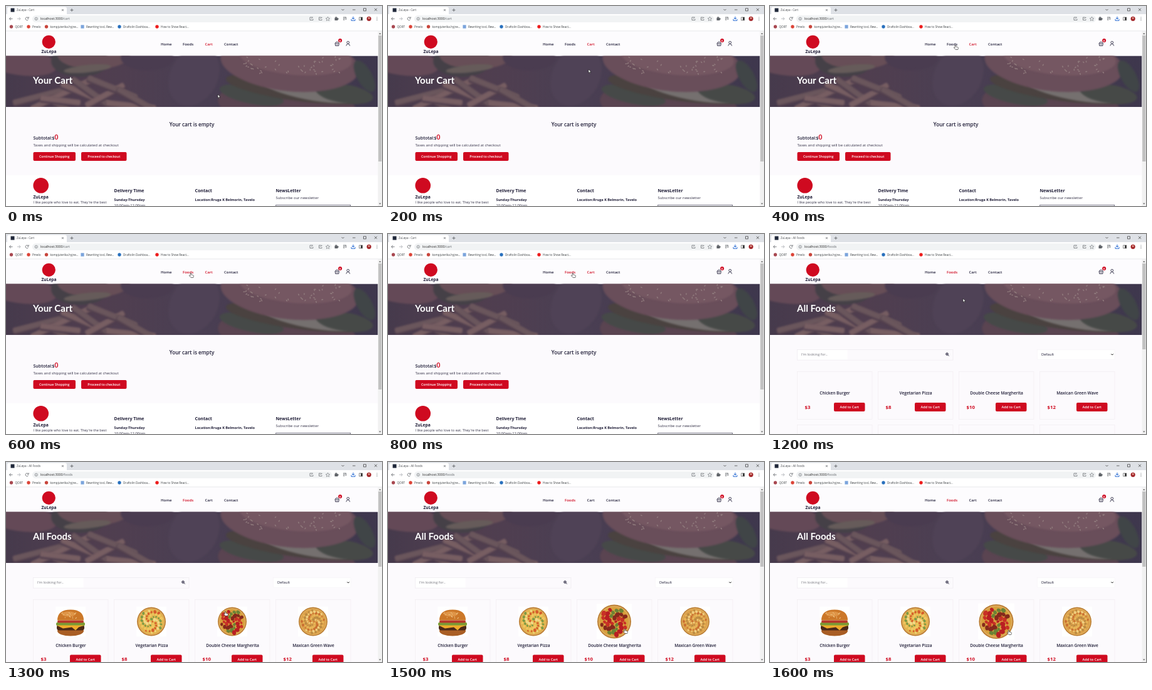
Animation, 600 px wide and 319 px high, one loop 1700 ms. Source, as an HTML page with a canvas:

```html
<!DOCTYPE html>
<html lang="en">
<head>
<meta charset="utf-8">
<title>Food shop</title>
<style>
html, body { margin: 0; width: 100%; height: 100%; overflow: hidden; background: #fff; }
canvas { display: block; width: 600px; height: 319px; }
</style>
</head>
<body>
<canvas id="stage"></canvas>
<script>
const W = 600, H = 319, LOOP = 1700, STEP = 100;
const RED = '#cf0a20', INK = '#1d1b35', GREY = '#5f6368';
const SANS = '"Open Sans", "Noto Sans", sans-serif';
const BRAND = 'ZuLepa';
const canvas = document.getElementById('stage');
const ctx = canvas.getContext('2d');
const ratio = window.devicePixelRatio || 1;
canvas.width = W * ratio;
canvas.height = H * ratio;

// Pointer position at each step of the loop.
const POINTER = [
  [338, 141], [335, 133], [320, 101], [303, 73], [296, 62], [296, 62], [295, 62], [295, 62], [295, 62],
  [295, 62], [295, 63], [299, 76], [308, 103], [350, 238], [366, 256], [378, 266], [381, 268]
];

function rect(x, y, w, h, color) {
  ctx.fillStyle = color;
  ctx.fillRect(x, y, w, h);
}
function round(x, y, w, h, r, color) {
  ctx.fillStyle = color;
  ctx.beginPath();
  ctx.roundRect(x, y, w, h, r);
  ctx.fill();
}
function frame(x, y, w, h, color, width = .6) {
  ctx.strokeStyle = color;
  ctx.lineWidth = width;
  ctx.strokeRect(x, y, w, h);
}
function oval(x, y, rx, ry, color, turn = 0) {
  ctx.fillStyle = color;
  ctx.beginPath();
  ctx.ellipse(x, y, rx, ry, turn, 0, 7);
  ctx.fill();
}
function disc(x, y, r, color) { oval(x, y, r, r, color); }
function ring(x, y, r, color, width = .8, from = 0, to = 7) {
  ctx.strokeStyle = color;
  ctx.lineWidth = width;
  ctx.beginPath();
  ctx.arc(x, y, r, from, to);
  ctx.stroke();
}
function line(path, color, width = .8) {
  ctx.strokeStyle = color;
  ctx.lineWidth = width;
  ctx.stroke(new Path2D(path));
}
function text(str, x, y, size, color = INK, weight = 400, align = 'left', family = SANS) {
  ctx.font = `${weight} ${size}px ${family}`;
  ctx.fillStyle = color;
  ctx.textAlign = align;
  ctx.fillText(str, x, y);
}
function button(label, x, y, w, size) {
  round(x, y, w, 14, 2, RED);
  text(label, x + w / 2, y + 9, size, '#fff', 600, 'center');
}
function random(seed) {
  return () => (seed = (seed * 16807) % 2147483647) / 2147483647;
}

function drawBrowser(title, path) {
  rect(0, 0, W, 13, '#dee1e6');
  round(2, 1.5, 95, 14, [3, 3, 0, 0], '#fff');
  rect(0, 13, W, 27, '#fff');
  rect(0, 39.6, W, .6, '#d8dade');
  rect(7.5, 3.5, 6, 6, '#20283a');
  text(`${BRAND} - ${title}`, 17, 8.4, 4.5, '#45484d');
  line('M89 5l3 3m0-3l-3 3 M102.5 6.5h5m-2.5-2.5v5', '#45484d', .7);
  line('M535.5 5l2 2 2-2 M553 6h4.5 M570.5 3.8h4v4h-4z M588 3.8l4 4m0-4l-4 4', '#333', .7);

  line('M10.5 20.3h-5m2.3-2.4l-2.4 2.4 2.4 2.4', GREY);
  line('M18 20.3h5m-2.3-2.4l2.4 2.4-2.4 2.4', '#a9adb2');
  ring(33.5, 20.3, 2.4, GREY, .8, .4, 5.6);
  line('M36.2 17.2v2.3h-2.3', GREY);
  round(42, 15, 478, 11, 5.5, '#f1f3f4');
  ring(48.2, 20.4, 2.2, GREY, .6);
  line('M48.2 20v1.6m0-2.7v.5', GREY, .6);
  const host = 'localhost:3000';
  text(host, 55, 22.2, 5.25, '#222');
  text(path, 55 + ctx.measureText(host).width, 22.2, 5.25, GREY);

  line('M489 18h-4v4.5h5v-2 M487 20.5l3-2.8 M502 18h-2.5v4.5h4.5v-1.5 M501 20.5q1-2 3-2m-1-1l1 1-1 1', GREY, .7);
  line('M513.5 17.3l1 2 2.2.3-1.6 1.5.4 2.2-2-1-2 1 .4-2.2-1.6-1.5 2.2-.3z', GREY, .6);
  round(524.5, 18.5, 5, 4.6, .6, GREY);
  disc(526.7, 18, 1.1, GREY);
  disc(529.8, 20.6, 1.1, GREY);
  line('M538 18h5m-5 2h3m-3 2h2.5 M542.5 18v4', GREY, .9);
  line('M554 16.8v4m-2-1.8l2 2 2-2 M551 21v2.2h6V21', '#2367d1', 1);
  frame(563.8, 18, 5, 4.8, '#333');
  rect(566.2, 18, 2.6, 4.8, '#333');
  disc(579.2, 20.3, 3.6, '#a52a2e');
  disc(579.2, 19.2, 1.2, '#efc2ae');
  [18, 20.3, 22.6].forEach(y => disc(592, y, .6, GREY));

  const marks = [
    [8.5, '#a84850', 'QORT'], [36, '#dc4437', 'Pmelo'], [64.5, '#c8453b', 'kompjuterika.hyjne...'],
    [122, '#7ba4dc', 'Rewriting tool, Rew...'], [181, '#2870bd', 'Draftolin Dashboa...'],
    [241, '#ee1c1c', 'How to Show React...']
  ];
  marks.forEach(([x, color, label], i) => {
    if (i === 3) rect(x - 2.6, 30.3, 5.2, 5.4, color);
    else disc(x, 33, 2.7, color);
    text(label, x + 6, 34.8, 4.6, '#3c4043');
  });
}

function drawScrollbar(bottom) {
  rect(593.5, 40, 6.5, 279, '#f1f1f1');
  rect(594.2, 47, 5.2, bottom - 47, '#c1c1c1');
  ctx.fillStyle = '#666';
  ctx.fill(new Path2D('M595 45l1.8-2 1.8 2z M595 314.5l1.8 2 1.8-2z'));
}

function drawHeader(foodsColor, cartColor) {
  rect(0, 40, 593.5, 39.5, '#fdfcfe');
  disc(68.3, 57.3, 10.6, RED);
  text(BRAND, 68.5, 75.2, 6.6, INK, 700, 'center');
  [['Home', 247, INK], ['Foods', 282, foodsColor], ['Cart', 317.5, cartColor], ['Contact', 348, INK]]
    .forEach(([label, x, color]) => text(label, x, 63, 6, color, 600));
  line('M525 59.2h6.6l-.7 4.2h-5.2z M526.2 59l1.4-2.6m2.8 2.6l-1.4-2.6 M527.2 60.5v1.8m2.2-1.8v1.8', INK, .8);
  disc(533.2, 55, 3, RED);
  text('0', 533.2, 56.5, 4, '#fff', 700, 'center');
  ring(545.8, 58.2, 1.9, INK, .8);
  line('M542.9 63.6q0-3 2.9-3t2.9 3', INK, .8);
}

function drawHero(title) {
  const top = 79.5, bottom = 161;
  ctx.save();
  ctx.beginPath();
  ctx.rect(0, top, 593.5, bottom - top);
  ctx.clip();
  const base = ctx.createLinearGradient(0, 0, 594, 0);
  base.addColorStop(0, '#4c3e4e');
  base.addColorStop(.25, '#584352');
  base.addColorStop(.5, '#514456');
  base.addColorStop(1, '#423b4f');
  rect(0, top, 594, 82, base);
  ctx.filter = 'blur(1.5px)';

  oval(20, 88, 62, 22, '#70515b', .15);
  oval(118, 88, 46, 25, '#4a4648');
  oval(140, 78, 58, 23, '#74575b');
  oval(130, 100, 38, 6, '#72675f', -.1);
  oval(225, 82, 42, 20, '#504053');
  oval(300, 112, 38, 50, '#56485a', .5);

  // Fries fan out over the board: x, y, length, angle.
  [[10, 150, 92, -.25], [38, 160, 110, -.45], [78, 148, 90, .5], [90, 120, 100, .4], [108, 112, 96, .62],
   [125, 155, 70, -.5], [132, 110, 85, .38], [160, 150, 80, .1], [180, 128, 65, .52], [55, 142, 65, .12]]
    .forEach(([x, y, len, angle], i) => {
      ctx.save();
      ctx.translate(x, y);
      ctx.rotate(angle);
      round(0, 2, len, 10, 3, '#594450');
      round(0, 0, len, 9, 3, i % 2 ? '#876a69' : '#776061');
      ctx.restore();
    });

  oval(448, 158, 110, 38, '#644a54', .08);
  oval(392, 142, 52, 14, '#4b5149', .2);
  oval(462, 132, 112, 19, '#50483f', .14);
  oval(480, 136, 70, 13, '#858079', .2);
  oval(540, 140, 46, 15, '#4c5148', .15);
  oval(453, 92, 111, 44, '#76565f', .1);
  oval(462, 82, 90, 28, '#856269', .08);
  oval(572, 112, 12, 28, '#444b48', -.5);
  ctx.filter = 'none';

  const rnd = random(41);
  for (let i = 0; i < 48; i++) {
    oval(380 + rnd() * 155, 81 + rnd() * 28, 1.6, .8, '#a58c89', rnd() * 3);
  }
  rect(0, top, 594, 82, 'rgba(48,42,68,.18)');
  ctx.restore();
  text(title, 43, 124, 15, '#fff', 700, 'left', 'Lato, sans-serif');
}

function drawCart() {
  text('Your cart is empty', 296.5, 192, 8.2, INK, 600, 'center');
  text('Subtotal:', 43.5, 212.5, 7, INK, 600);
  text('$', 73.5, 212.5, 7, INK, 600);
  text('0', 77.3, 213, 11, RED, 600);
  text('Taxes and shipping will be calculated at checkout', 43.5, 223.5, 6, '#343247');
  button('Continue Shopping', 43.5, 233, 67.5, 5.3);
  button('Proceed to checkout', 120, 233, 72.5, 5.3);

  rect(0, 270, 593.5, 49, '#fff');
  disc(55.7, 286.3, 12.3, RED);
  text(BRAND, 43.5, 306.5, 6.7, INK, 700);
  text("I like people who love to eat. They're the best", 43.5, 315.2, 5.6, '#343247');
  text('Delivery Time', 172.5, 297.2, 7, INK, 700);
  text('Sunday-Thursday', 172.5, 311, 5.7, INK, 700);
  text('10:00am-11:00pm', 172.5, 320.2, 5.9, '#343247');
  text('Contact', 301.5, 297.2, 7, INK, 700);
  text('Location:Rruga K Belmorin, Tavelo', 301.5, 311, 5.6, INK, 700);
  text('NewsLetter', 430.5, 297.2, 6.9, INK, 700);
  text('Subscribe our newsletter', 430.5, 308, 5.9, '#343247');
  frame(430.7, 317.5, 119, 15, '#44425a', .7);
}

function drawBurger() {
  oval(0, 15, 21, 8, '#a95e25');
  round(-22, 5, 44, 9, 4, '#4b2918');
  round(-23, 1, 46, 6, 3, '#7b9b35');
  round(-21, -2, 42, 4, 2, '#b8372b');
  ctx.fillStyle = '#efab2a';
  ctx.fill(new Path2D('M-22 6h44l-9 3-5 5-6-5-14 2z'));
  ctx.fillStyle = '#cc7829';
  ctx.fill(new Path2D('M-21-2q0-17 21-17t21 17z'));
  oval(-3, -12, 11, 4, '#df9547');
  const rnd = random(9);
  for (let i = 0; i < 18; i++) oval(-14 + rnd() * 28, -15 + rnd() * 10, .8, .5, '#f4d59a');
}

function drawPizza(seed, cheese, toppings, count, size) {
  disc(0, 0, 23, '#b87931');
  disc(0, 0, 21.6, '#ddaa58');
  disc(0, 0, 19.8, cheese);
  const rnd = random(seed);
  for (let i = 0; i < count; i++) {
    const r = 18.3 * Math.sqrt((i + .5) / count), a = i * 2.4;
    const s = size * (.6 + rnd() * .6);
    oval(r * Math.cos(a), r * Math.sin(a), s, s * .8, toppings[i % toppings.length], rnd() * 3);
  }
}

const FOODS = [
  ['Chicken Burger', '$3', drawBurger],
  ['Vegetarian Pizza', '$8', () => drawPizza(5, '#e4b64f', ['#d65d2c', '#f1d987', '#7d9a45', '#f0c760'], 55, 2.4)],
  ['Double Cheese Margherita', '$10', () => drawPizza(7, '#d8a03d', ['#b91f23', '#c83126', '#86291c', '#6c8335'], 34, 3.4)],
  ['Maxican Green Wave', '$12', () => drawPizza(11, '#dca04a', ['#c96e32', '#f0cf81', '#b98a42', '#e8b759'], 75, 2)]
];

function drawFoods(loaded, zoom) {
  rect(43.5, 184.5, 80, 16, '#fff');
  frame(43.5, 184.3, 248.5, 16.8, '#ece8ed');
  text("I'm looking for..", 50, 194.3, 5.8, '#74747c');
  ring(282.5, 191.5, 1.9, INK, .9);
  line('M283.9 192.9l1.8 1.8 M281.5 191.5h2m-1-1v2', INK, .8);
  rect(426.5, 184.5, 123.5, 15.5, '#fff');
  frame(426.5, 184.5, 123.5, 15.5, '#f4f1f5', .5);
  text('Default', 433, 194.2, 5.9, INK);
  line('M544.4 191.2l1.7 1.8 1.7-1.8', '#111', .9);

  const shift = loaded ? 38.5 : 0;
  FOODS.forEach(([name, price, picture], i) => {
    const x = 43.5 + i * 129, middle = x + 59.5;
    frame(x, 219.3, 119.5, 76 + shift, '#f1ebf0');
    if (!loaded) frame(x, 304.5, 119.5, 76, '#f1ebf0');
    if (loaded) {
      ctx.save();
      ctx.translate(middle, 254.5);
      if (i === 2) ctx.scale(zoom, zoom);
      rect(-24, -24, 48, 48, '#fff');
      picture();
      ctx.restore();
    }
    text(name, middle + .5, 256 + shift, 6.6, INK, 600, 'center');
    text(price, x + 12, 278.5 + shift, 7.8, RED, 700);
    button('Add to Cart', x + 58.5, 269 + shift, 49.5, 5.6);
  });
}

function drawPointer(x, y, hand) {
  ctx.save();
  ctx.translate(x, y);
  const shape = new Path2D(hand
    ? 'M-.8.7Q0-.4.8.7V3l3 .7q.8.3.6 1.4L3.8 7.5H0L-2.6 4.5q0-1 1-.6l.8.7z'
    : 'M0 0v5.6l1.3-1.2.9 2 .9-.4-.9-1.9h1.8z');
  ctx.fillStyle = '#fff';
  ctx.fill(shape);
  ctx.strokeStyle = '#111';
  ctx.lineWidth = .55;
  ctx.stroke(shape);
  ctx.restore();
}

function draw(now) {
  const step = Math.floor((now % LOOP) / STEP);
  const onFoods = step >= 9, loaded = step >= 13;
  const zoom = 1 + .2 * Math.sin(Math.min(1, Math.max(0, (step - 13) / 3)) * Math.PI / 2);
  ctx.setTransform(ratio, 0, 0, ratio, 0, 0);
  rect(0, 0, W, H, '#fcfafd');
  if (onFoods) drawFoods(loaded, zoom);
  else drawCart();
  drawHeader(step >= 5 ? RED : INK, step < 10 ? RED : INK);
  drawHero(onFoods ? 'All Foods' : 'Your Cart');
  drawBrowser(step < 10 ? 'Cart' : 'All Foods', onFoods ? '/foods' : '/cart');
  drawScrollbar(loaded ? 167 : onFoods ? 184 : 248);
  drawPointer(...POINTER[step], (step >= 4 && step <= 10) || loaded);
}

const start = performance.now();
function tick() {
  draw(performance.now() - start);
  requestAnimationFrame(tick);
}
tick();
</script>
</body>
</html>
```
